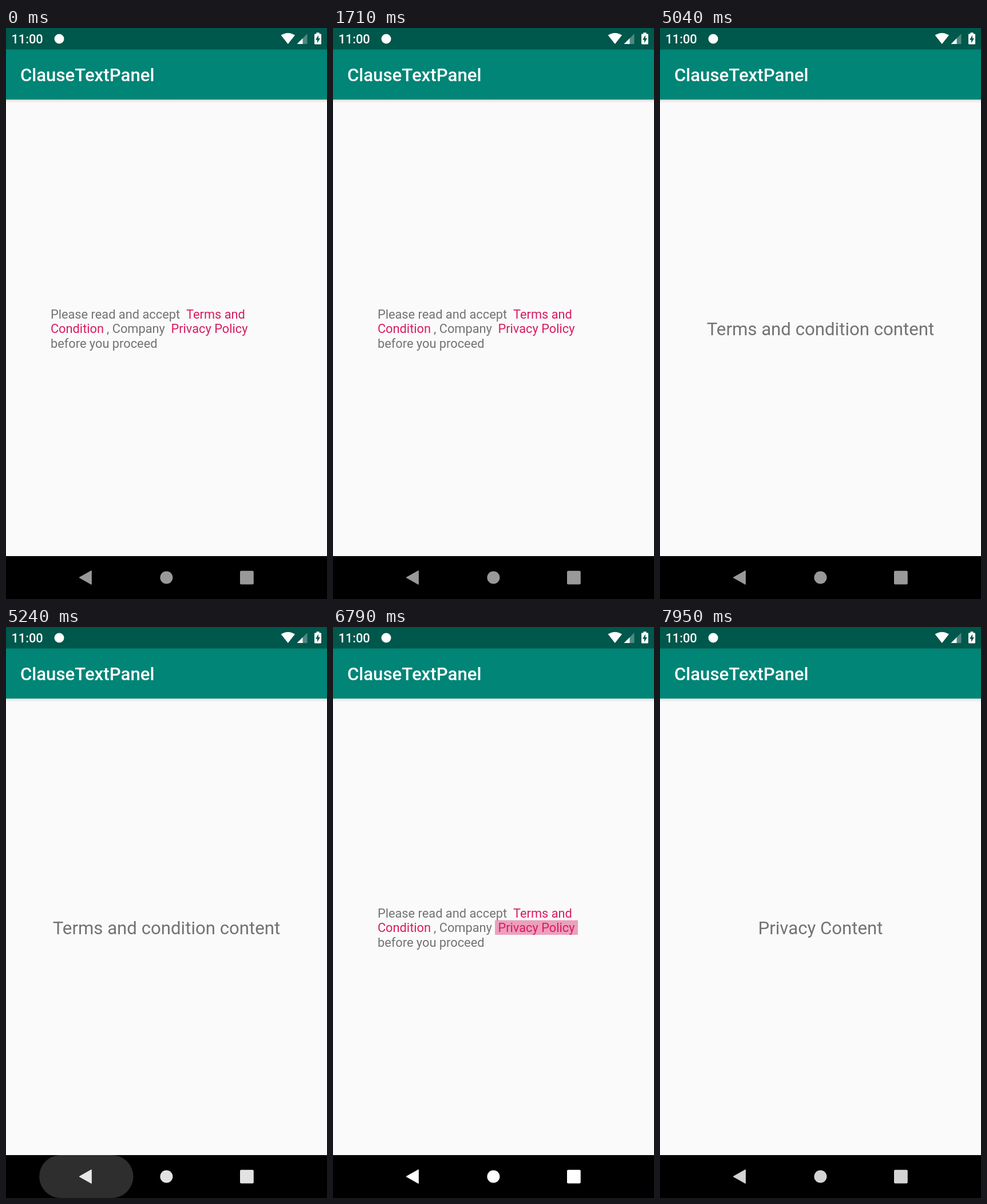
An HTML page for the animation above (7.99 s loop, 561 px wide and 998 px high).

```html
<!DOCTYPE html>
<html lang="en">
<head>
<meta charset="utf-8">
<title>Consent screen</title>
<style>
  html, body { margin: 0; width: 100%; height: 100%; overflow: hidden; background: #fafafa; }
  svg { display: block; width: 561px; height: 998px; font-family: Roboto, sans-serif; font-size: 21.8px; }
  .bold { font-weight: 500; fill: #fff; }
  .big { font-size: 31.2px; }
  .grey { fill: #737373; }
  .link { fill: #d81b60; }
  .mark { fill: #d81b60; fill-opacity: .4; }
</style>
</head>
<body>
<svg viewBox="0 0 561 998">
  <defs>
    <linearGradient id="shade" x2="0" y2="1">
      <stop stop-opacity=".2"/>
      <stop offset=".4" stop-opacity=".06"/>
      <stop offset="1" stop-opacity="0"/>
    </linearGradient>
  </defs>
  <rect width="561" height="998" fill="#fafafa"/>
  <rect y="124.5" width="561" height="7" fill="url(#shade)"/>
  <rect width="561" height="125" fill="#008577"/>
  <rect width="561" height="37.5" fill="#00574b"/>

  <!-- status bar -->
  <text class="bold" x="9.4" y="26.7">11:00</text>
  <g fill="#fff">
    <circle cx="93" cy="19" r="8.5"/>
    <path d="M492.8 28 480.6 12.6Q492.8 5 505 12.6Z"/>
    <path d="M526.5 10V28H508.5Z" opacity=".3"/>
    <path d="M518.5 18V28H508.5Z"/>
    <path d="M542.5 10.2V8H547.5V10.2H549.6Q551 10.2 551 11.6V27.2Q551 28.6 549.6 28.6H540.4Q539 28.6 539 27.2V11.6Q539 10.2 540.4 10.2Z"/>
  </g>
  <path d="M546 12.5 541 20.7H544V26.2L549 18H546Z" fill="#00574b"/>
  <text class="bold big" x="24.9" y="93">ClauseTextPanel</text>

  <!-- pages -->
  <g id="consent">
    <path id="termsMark" class="mark" d="M309.7 484H483V512.5H309.7ZM78 512.5H176V538H78Z"/>
    <path id="privacyMark" class="mark" d="M283 512.5H428V538H283Z"/>
    <g class="grey">
      <text x="77.9" y="507.6">Please read and accept</text>
      <text x="176" y="533.1">, Company</text>
      <text x="77.9" y="558.6">before you proceed</text>
    </g>
    <g class="link">
      <text x="315" y="507.6">Terms and</text>
      <text x="77.9" y="533.1">Condition</text>
      <text x="288.4" y="533.1">Privacy Policy</text>
    </g>
  </g>
  <g class="big grey" text-anchor="middle">
    <text id="terms" x="280.5" y="536.6">Terms and condition content</text>
    <text id="privacy" x="280.5" y="536.6">Privacy Content</text>
  </g>

  <!-- navigation bar -->
  <rect y="923" width="561" height="75" fill="#000"/>
  <rect id="ripple" y="923" height="75" rx="37.5" fill="#fff"/>
  <g id="nav" fill="#fff">
    <path d="M128 960.5 149.3 948.5V972.5Z" stroke="#fff" stroke-linejoin="round"/>
    <circle cx="280.4" cy="960.5" r="11"/>
    <rect x="409" y="948.7" width="23.8" height="23.8" rx="2"/>
  </g>
</svg>
<script>
const LOOP = 7990;
const PRESS_TERMS = 3120, OPEN_TERMS = 5040;
const BACK_DOWN = 5080, BACK_UP = 5210, RETURN = 5290;
const PRESS_PRIVACY = 6790, OPEN_PRIVACY = 7280;
const DIM = 0.6;

const el = id => document.getElementById(id);
const [consent, terms, privacy, termsMark, privacyMark, ripple, nav] =
  ['consent', 'terms', 'privacy', 'termsMark', 'privacyMark', 'ripple', 'nav'].map(el);

const progress = (t, start, length) => Math.min(1, Math.max(0, (t - start) / length));
const smooth = p => (1 - Math.cos(Math.PI * p)) / 2;
const show = (node, on) => { node.style.display = on ? '' : 'none'; };

function draw(t) {
  const onTerms = t >= OPEN_TERMS && t < RETURN;
  const onPrivacy = t >= OPEN_PRIVACY;
  show(terms, onTerms);
  show(privacy, onPrivacy);
  show(consent, !onTerms && !onPrivacy);
  show(termsMark, t >= PRESS_TERMS && t < OPEN_TERMS);
  show(privacyMark, t >= PRESS_PRIVACY);

  // Icons light up on touch, then dim slowly on the next page.
  const light = smooth(progress(t, BACK_DOWN, 250)) - smooth(progress(t, OPEN_PRIVACY, 1500));
  nav.setAttribute('opacity', DIM + (1 - DIM) * light);

  // Pill grows sideways from the back button and fades on release.
  const grow = 1 - Math.pow(400, -1.4 * progress(t, BACK_DOWN, 350));
  const fade = Math.pow(1 - progress(t, BACK_UP, 450), 1.5);
  const width = 168 * grow;
  ripple.setAttribute('x', 140.3 - width / 2);
  ripple.setAttribute('width', width);
  ripple.setAttribute('opacity', t < BACK_DOWN ? 0 : 0.2 * fade);
}

const start = performance.now();
function tick() {
  draw((performance.now() - start) % LOOP);
  requestAnimationFrame(tick);
}
tick();
</script>
</body>
</html>
```
